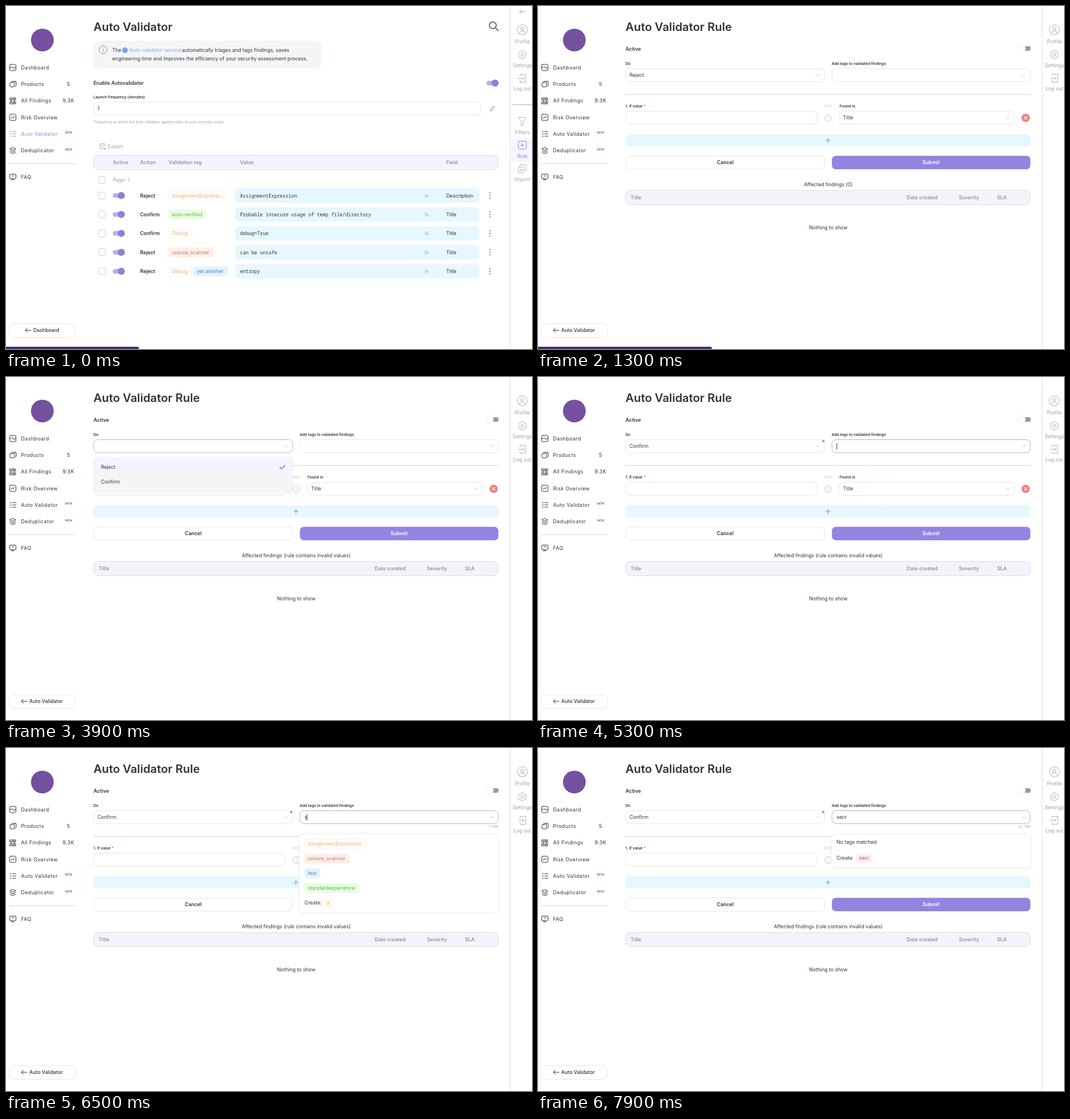
Animation, 926 px wide and 605 px high, one loop 8 s. Source, as an HTML page:

```html
<!DOCTYPE html>
<html lang="en">
<head>
<meta charset="utf-8">
<title>Auto Validator</title>
<style>
html, body { margin: 0; width: 100%; height: 100%; overflow: hidden; background: #fff; }
svg { display: block; width: 926px; height: 605px; }
text { font: 400 8.77px Inter, "Open Sans", sans-serif; fill: #333337; white-space: pre; }
.h1 { font-size: 20.3px; font-weight: 600; }
.b { font-weight: 600; font-size: 8.85px; }
.m { font-weight: 500; }
.label { font-weight: 600; font-size: 6.65px; }
.small { font-size: 6.55px; }
.nav { letter-spacing: .45px; }
.new { font-size: 5.4px; font-weight: 600; }
.mono { font: 400 8.37px "Noto Sans Mono", "DejaVu Sans Mono", monospace; }
.mid { text-anchor: middle; }
.end { text-anchor: end; }
.icon { fill: none; stroke-width: 1; stroke-linecap: round; stroke-linejoin: round; }
.menu { transform-box: fill-box; transform-origin: top; filter: drop-shadow(0 1px 2px #0000000c); }
</style>
</head>
<body>
<svg id="stage" viewBox="0 0 926 605"></svg>
<script>
const LOOP = 8000;
const DARK = '#333337', GREY = '#a0a0a6', PALE = '#c6c6ce', EDGE = '#e6e6eb', VIOLET = '#8f84de', SKY = '#e6f7fe';

// y is the visual middle of the capitals
const text = (x, y, s, cls = '', fill = DARK) =>
  `<text x="${x}" y="${y + (cls.includes('h1') ? 7.3 : /small|label|new/.test(cls) ? 2.4 : 3.2)}" class="${cls}" style="fill:${fill}">${s}</text>`;
const box = (x, y, w, h, r, fill, stroke = 'none') =>
  `<rect x="${x}" y="${y}" width="${w}" height="${h}" rx="${r}" fill="${fill}" stroke="${stroke}"/>`;
const dot = (x, y, r, fill) => `<circle cx="${x}" cy="${y}" r="${r}" fill="${fill}"/>`;
const icon = (x, y, d, color = DARK, width = 1) =>
  `<path class="icon" transform="translate(${x} ${y})" d="${d}" stroke="${color}" style="stroke-width:${width}"/>`;
const line = (x1, x2, y, color = '#cfcfd3') => `<path d="M${x1} ${y}H${x2}" stroke="${color}"/>`;
const group = (id, body, cls = '') => `<g id="${id}" class="${cls}">${body}</g>`;
const ring = (r, x = 0, y = 0) => `M${x - r} ${y}a${r} ${r} 0 1 0 ${2 * r} 0a${r} ${r} 0 1 0 ${-2 * r} 0`;
const square = (s, x = 0, y = 0) =>
  `M${x - s + 2} ${y - s}h${2 * s - 4}q2 0 2 2v${2 * s - 4}q0 2 -2 2h${4 - 2 * s}q-2 0 -2 -2v${4 - 2 * s}q0 -2 2 -2z`;

const ICONS = {
  dashboard: square(5.5) + 'M-5 0h2l2 -2l3 4l1.5 -2h2',
  products: square(4, -1, 1) + 'M-3 -3l2 -2h5q2 0 2 2v5l-2 2M3 -3l2 -2',
  findings: 'M-5 -5h10v3.5h-10zM-5 2h10v3.5h-10zM-3 -3.3h1M-3 3.7h1M0 -3.3h3M0 3.7h3M-3 -1.5v3.5M3 -1.5v3.5',
  risk: square(5.5) + 'M-3 2l2 -3l2 2l2 -3',
  checks: 'M-5 -4l1 1l2 -2M-5 0l1 1l2 -2M-5 4l1 1l2 -2M0 -4h5.5M0 0h5.5M0 4h5.5',
  layers: 'M0 -5.5l5 2.5l-5 2.5l-5 -2.5zM-5 0l5 2.5l5 -2.5M-5 3l5 2.5l5 -2.5',
  faq: 'M-4 -5h8q1.5 0 1.5 1.5v5q0 1.5 -1.5 1.5h-1l-2 2v-2h-5q-1.5 0 -1.5 -1.5v-5q0 -1.5 1.5 -1.5M-3 5h5M-1 -2q1 -2 2 0q0 1 -1 1.5',
  back: 'M5 0h-10M-1.5 -3.5l-3.5 3.5l3.5 3.5',
  profile: ring(9) + ring(3, 0, -2) + 'M-5 7q0 -5 5 -5q5 0 5 5',
  logout: 'M-4 -4v-3h10v14h-10v-3M-7 0h10M0 -3l3 3l-3 3',
  filter: 'M-6 -7h12q1 1 0 2l-4 5v6l-4 2v-8l-4 -5q-1 -1 0 -2z',
  plusBox: square(7) + 'M-3 0h6M0 -3v6',
  importBox: square(5, -2, 2) + 'M-4.5 2h5M-2 -.5v5M-4 -5v-2h10q1 0 1 1v9h-2',
  pencil: 'M-3 4l.6 -2.5l4.5 -6l2 1.5l-4.5 6z',
  refresh: 'M4.5 -1v-2q0 -2 -2 -2h-5q-2 0 -2 2v5q0 2 2 2h2M-2 -1q2 -3 4 0M2 2l3 2l-2 1l-1 -3',
  down: 'M-3 -1.5l3 3l3 -3',
  up: 'M-3 1.5l3 -3l3 3'
};
const gear = () => {
  const pts = Array.from({ length: 24 }, (_, i) => {
    const a = i * Math.PI / 12, r = [7.6, 7, 5.8, 7][i % 4];
    return `${(r * Math.sin(a)).toFixed(2)} ${(-r * Math.cos(a)).toFixed(2)}`;
  });
  return 'M' + pts.join('L') + 'z' + ring(2.5);
};

const toggle = (x, y, on = true) => on
  ? box(x, y - 4, 18, 8, 4, '#b7afea') + dot(x + 15, y, 6.2, '#8b80dc')
  : box(x + 4, y - 4, 17, 8, 3, '#9a96ab') + `<circle cx="${x + 6}" cy="${y}" r="6.2" fill="#fff" stroke="#e8e8ed" stroke-width=".8"/>`;

const TAGS = {
  orange: ['#f0b070', '#fffdfb', '#fdf3e6'],
  green: ['#58bd4c', '#e9fce2', 'none'],
  red: ['#d4755f', '#fdefea', 'none'],
  blue: ['#3c84c4', '#e3f2fe', 'none'],
  yellow: ['#eaa94a', '#fffaea', 'none'],
  pink: ['#c0456b', '#fdf0f1', 'none']
};
const tag = (x, y, w, label, tone) => {
  const [ink, fill, edge] = TAGS[tone];
  return box(x, y - 8.5, w, 17, 3, fill, edge) + text(x + 6, y, label, '', ink);
};

function sidebar() {
  const items = [['Dashboard', 'dashboard'], ['Products', 'products', '5'], ['All Findings', 'findings', '9.3K'],
    ['Risk Overview', 'risk'], ['Auto Validator', 'checks', 'NEW'], ['Deduplicator', 'layers', 'NEW']];
  return dot(64, 60, 20, '#74509f') + items.map(([name, art, note], i) => {
    const y = 108.5 + i * 29.3;
    const extra = !note ? '' : note === 'NEW' ? text(110.3, y - 2.8, note, 'new mid', '#9b4fc0')
      : text(110, y, note, 'nav mid');
    return icon(12, y, ICONS[art]) + text(26.5, y, name, 'nav') + extra;
  }).join('') + line(6, 123, 278) + icon(12, 301.5, ICONS.faq) + text(26.5, 301.5, 'FAQ', 'nav')
    + box(5.5, 560.5, 117, 24, 8, '#fff', EDGE);
}

function rail() {
  const items = [['Profile', ICONS.profile, 42, 63], ['Settings', gear(), 86, 104.5], ['Log out', ICONS.logout, 127.5, 146]];
  return '<path d="M887.5 0V605" stroke="#dededf"/>' + items.map(([s, d, y, ly]) =>
    icon(909, y, d, GREY, .8) + text(909, ly, s, 'mid', GREY)).join('');
}

function listPage() {
  const rows = [
    ['Reject', [[286, 103, 'AssignmentExpressi…', 'orange']], 'AssignmentExpression', 'Description'],
    ['Confirm', [[286, 66, 'auto-verified', 'green']], 'Probable insecure usage of temp file/directory', 'Title'],
    ['Confirm', [[286, 41, 'Debug', 'orange']], 'debug=True', 'Title'],
    ['Reject', [[286, 79, 'unsure_scanner', 'red']], 'can be unsafe', 'Title'],
    ['Reject', [[286, 41, 'Debug', 'orange'], [330, 60, 'yet another', 'blue']], 'entropy', 'Title']
  ];
  const check = y => box(163, y - 6, 12, 12, 2, '#fff', '#cfcfd6');
  const heads = [[188, 'Active'], [236, 'Action'], [286, 'Validation tag'], [412, 'Value'], [775, 'Field']];
  return box(5, 217, 118, 18, 0, '#fff') + icon(12, 225.7, ICONS.checks, VIOLET)
    + text(26.5, 225.7, 'Auto Validator', 'nav', VIOLET) + text(110.3, 222.9, 'NEW', 'new mid', '#9b4fc0')
    + icon(39, 572, ICONS.back) + text(48, 572, 'Dashboard', 'm')
    + text(154, 37, 'Auto Validator', 'h1')
    + icon(857, 34, ring(6) + 'M4.5 4.5l5 5', '#77777b', 2.2)
    + box(154, 61, 402, 49.5, 10, '#f3f6f5')
    + icon(171, 77, ring(7) + 'M0 -1v4M0 -3.5v.2', '#8a8a92')
    + text(187, 78, 'The') + dot(209.5, 78, 5, '#7fa2ea')
    + text(217, 78, 'Auto-validator service', '', '#8ba6ef')
    + text(310, 78, 'automatically triages and tags findings, saves')
    + text(187, 93, 'engineering time and improves the efficiency of your security assessment process.')
    + text(154, 136, 'Enable Autovalidator', 'b') + toggle(846, 136)
    + text(154, 161, 'Launch frequency (minutes)', 'label')
    + box(154.5, 169.5, 681, 23, 6, '#fff', EDGE) + text(161, 181, '1')
    + icon(856, 181, ICONS.pencil, '#8a8a92')
    + text(154, 204.5, 'Frequency at which the Auto Validator applies rules to your security scans.', 'small', GREY)
    + icon(170, 248, ICONS.refresh, GREY) + text(179, 248, 'Export', '', GREY)
    + box(154.5, 263.5, 712, 25, 8, '#f5f2fd', '#dfdbea')
    + heads.map(([x, s]) => text(x, 276, s, 'b', '#95949f')).join('')
    + check(307) + text(188, 307, 'Page: 1', '', GREY)
    + rows.map(([action, tags, value, field], i) => {
      const y = 334.3 + i * 33.4;
      return check(y) + toggle(188, y) + text(236, y, action, 'b') + tags.map(([x, w, s, c]) => tag(x, y, w, s, c)).join('')
        + box(403.5, y - 12.5, 430, 25, 6, SKY) + text(412, y, value, 'mono') + text(737, y, 'In', '', GREY)
        + text(775, y, field) + [-4.5, 0, 4.5].map(d => dot(852, y + d, 1.1, '#77777d')).join('');
    }).join('')
    + icon(909, 10, ICONS.back, GREY) + line(890, 926, 174, '#a8a8ad')
    + box(889, 233.5, 37, 41, 0, '#f7f4fd')
    + icon(909, 203.5, ICONS.filter, GREY, .8) + text(909, 222.5, 'Filters', 'mid', GREY)
    + icon(909, 245.5, ICONS.plusBox, VIOLET) + text(909, 264.5, 'Rule', 'mid', VIOLET)
    + icon(909, 287, ICONS.importBox, GREY, .8) + text(909, 306, 'Import', 'mid', GREY);
}

function formPage() {
  const heads = [[163, 'Title'], [649, 'Date created'], [741, 'Severity'], [808, 'SLA']];
  const field = (id, x, y, w) => `<rect id="${id}" x="${x}" y="${y}" width="${w}" height="23" rx="7" fill="#fff" stroke="${EDGE}"/>`;
  return icon(32, 572, ICONS.back) + text(41, 572, 'Auto Validator', 'm')
    + text(154, 37, 'Auto Validator Rule', 'h1')
    + text(154, 75.5, 'Active', 'b') + toggle(846, 75, false)
    + text(154, 102, 'Do', 'label') + field('doField', 154.5, 110.5, 350) + '<g id="doText"></g>'
    + group('doDown', icon(492, 122, ICONS.down, PALE)) + group('doUp', icon(492, 122, ICONS.up, PALE))
    + group('doCaret', box(163.5, 117, 1, 11, 0, DARK)) + group('changed', dot(502.3, 113, 2.2, '#85a3ea'))
    + text(517, 102, 'Add tags to validated findings', 'label') + field('tagField', 517.5, 110.5, 349)
    + group('tagDown', icon(855, 122, ICONS.down, PALE)) + group('tagUp', icon(855, 122, ICONS.up, PALE))
    + '<g id="typed"></g>' + `<rect id="tagCaret" y="117" width="1" height="11" fill="${DARK}"/>`
    + line(154, 867, 156)
    + text(154, 177, '1. If value <tspan fill="#e0455a">*</tspan>', 'label')
    + field('value', 154.5, 185.5, 337) + text(511, 177, 'NOT', 'small mid', PALE)
    + icon(511, 197.5, ring(6) + 'M0 -3v3M0 2.5v.2', PALE)
    + text(531, 177, 'Found in', 'label') + field('where', 530.5, 185.5, 308) + text(537, 197, 'Title')
    + icon(827, 197, ICONS.down, PALE)
    + dot(858.5, 197.3, 7.3, '#ec807e') + icon(858.5, 197.3, 'M-2.5 -2.5l5 5M2.5 -2.5l-5 5', '#fff', 1.2)
    + box(154, 226.5, 713, 21, 5, SKY) + icon(510.5, 237, 'M-4 0h8M0 -4v8', '#6d9be0', 1.1)
    + box(154.5, 264.5, 350, 23.5, 7, '#fff', EDGE) + text(329.5, 276, 'Cancel', 'b mid')
    + box(517.4, 264.2, 349.4, 23.8, 7, '#9185e0') + text(692, 276, 'Submit', 'b mid', '#fff')
    + '<g id="affected"></g>'
    + box(154.5, 325.5, 712, 25, 8, '#f4f2fb', '#dfdbea')
    + heads.map(([x, s]) => text(x, 338, s, 'b', '#95949f')).join('')
    + text(511, 390.5, 'Nothing to show', 'mid')
    + group('doMenu', box(154, 141, 351, 63, 6, '#f5f3fd') + group('hover',
      '<path d="M154 172H505V198q0 6 -6 6H160q-6 0 -6 -6z" fill="#f3f6f5"/>')
      + text(167, 159, 'Reject') + text(167, 185, 'Confirm') + icon(486, 159, 'M-4 0l3 3l6 -6', '#6f63c8', 1.4), 'menu')
    + '<g id="count"></g><g id="tagMenu" class="menu"></g>';
}

function menuBody(word) {
  const rows = {
    '': [[102, 'AssignmentExpression', 'orange'], [66, 'auto-verified', 'green'], [41, 'Debug', 'orange'],
      [79, 'unsure_scanner', 'red'], [60, 'yet another', 'blue']],
    s: [[108, 'AssignmentExpression', 'orange'], [79, 'unsure_scanner', 'red'], [28, 'test', 'blue'], [96, 'standardexperience', 'green']]
  }[word];
  const panel = h => box(516.5, 151.5, 351, h, 6, '#fff', '#eeeef1');
  const create = (y, w, tone) => text(525.5, y, 'Create:') + tag(559, y, w, word, tone);
  if (!rows) {
    const [w, tone] = { se: [22, 'blue'], sec: [26, 'green'], secr: [30, 'pink'] }[word];
    return panel(60) + text(525.5, 166, 'No tags matched') + create(194, w, tone);
  }
  return panel(139.5) + rows.map(([w, s, c], i) => tag(525.5, 169 + i * 26, w, s, c)).join('') + (word ? create(273, 16, 'yellow') : '');
}

const stage = document.getElementById('stage');
stage.innerHTML = sidebar() + rail() + group('list', listPage()) + group('form', formPage())
  + '<path id="status" fill="#4b2a6b"/>';
const $ = id => document.getElementById(id);
const show = (id, on) => { $(id).style.display = on ? '' : 'none'; };
const cache = {};
const fill = (id, html) => { if (cache[id] !== html) $(id).innerHTML = cache[id] = html; };
const ramp = (t, a, b) => Math.min(1, Math.max(0, (t - a) / (b - a)));
const during = (t, a, b) => t >= a && t < b;
const typing = [[6300, 's', 529.3], [6700, 'se', 534], [6900, 'sec', 539], [7400, 'secr', 542.5]];

function unfold(id, amount) {
  const eased = 1 - (1 - amount) ** 2;
  show(id, amount > 0);
  $(id).style.opacity = eased;
  $(id).style.transform = `scaleY(${.8 + .2 * eased})`;
}

function draw(t) {
  const onForm = t >= 1100;
  show('list', !onForm);
  show('form', onForm);
  show('status', t < 2400);
  $('status').setAttribute('d', `M0 601H${onForm ? 303 : 231}q3 0 3 3v1H0z`);
  fill('affected', text(511, 315, t < 1700 ? 'Affected findings (0)' : 'Affected findings (rule contains invalid values)', 'mid'));

  const doOpen = during(t, 3200, 4500);
  fill('doText', doOpen ? '' : text(161, 122, t < 4500 ? 'Reject' : 'Confirm'));
  $('doField').setAttribute('stroke', doOpen ? '#b9b9c6' : EDGE);
  show('doUp', doOpen);
  show('doDown', !doOpen);
  show('doCaret', during(t, 3200, 3700) || during(t, 4200, 4500));
  show('hover', t >= 3800);
  show('changed', t >= 4500);
  unfold('doMenu', ramp(t, 3200, 3500) * (1 - ramp(t, 4400, 4600)));

  const focused = t >= 5300;
  const [since, word, caretX] = typing.filter(k => t >= k[0]).pop() || [5300, '', 525.5];
  $('tagField').setAttribute('stroke', focused ? '#b4b4c6' : EDGE);
  show('tagUp', t >= 5400);
  show('tagDown', t < 5400);
  fill('typed', text(525.5, 122, word));
  fill('count', focused ? text(867, 139, `${word.length} / 100`, 'small end', GREY) : '');
  show('count', t >= 5400);
  $('tagCaret').setAttribute('x', caretX);
  show('tagCaret', focused && (t - since) % 1000 < 500);
  fill('tagMenu', menuBody(word));
  unfold('tagMenu', ramp(t, 5300, 5500));
}

const start = performance.now();
(function tick() {
  draw((performance.now() - start) % LOOP);
  requestAnimationFrame(tick);
})();
</script>
</body>
</html>
```
